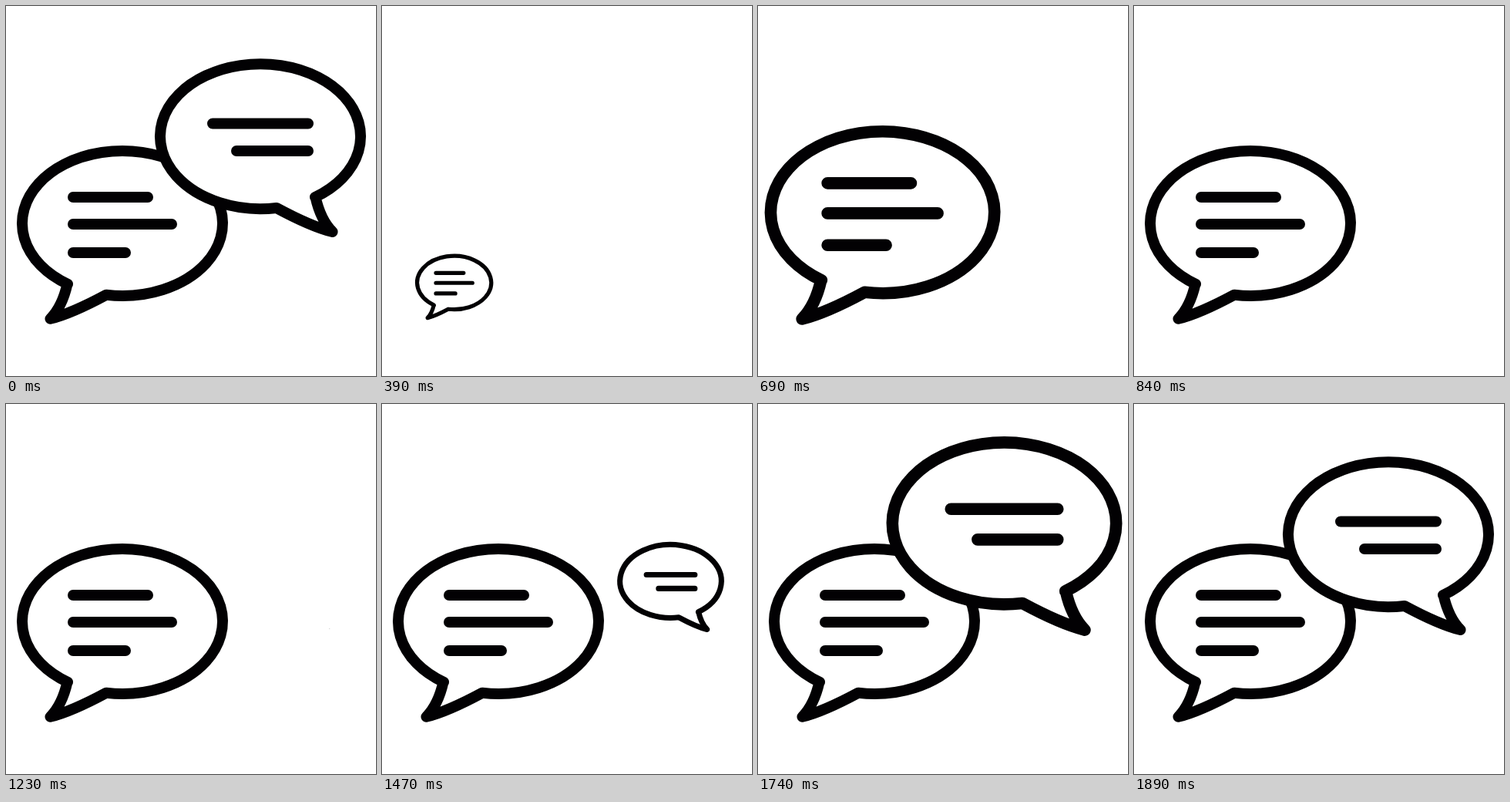
Write an HTML page with a canvas that moves like this. It is 480 px wide and 480 px high and loops after 2.7 s.

```html
<!DOCTYPE html>
<html lang="en">
<head>
<meta charset="utf-8">
<title>Chat bubbles</title>
<style>
  html, body { margin: 0; width: 100%; height: 100%; overflow: hidden; background: #fff; }
  canvas { display: block; width: 100vw; height: 100vh; }
</style>
</head>
<body>
<canvas id="stage" width="480" height="480"></canvas>
<script>
const ctx = document.getElementById('stage').getContext('2d');
const LOOP = 2700, STEP = 30;
const INK = '#020103', PAPER = '#fff';

// x, y: ellipse centre; pivot: fixed point of the scaling; lines: [x1, x2, y]
const bubbles = [
  { x: 151, y: 282, flip: 1, pivot: [60, 404], start: 150,
    lines: [[87, 184, 248], [87, 215, 283], [87, 155, 320]] },
  { x: 330, y: 169.2, flip: -1, pivot: [420, 292], start: 1200,
    lines: [[268, 392, 152.5], [299, 392, 188]] }
];

// cubic-bezier(a, 0, b, 1)
function ease(u, a, b) {
  if (u <= 0) return 0;
  if (u >= 1) return 1;
  let lo = 0, hi = 1, p = 0.5;
  for (let i = 0; i < 24; i++) {
    p = (lo + hi) / 2;
    const q = 1 - p;
    const x = 3 * p * q * q * a + 3 * p * p * q * b + p * p * p;
    if (x < u) lo = p; else hi = p;
  }
  return p * p * (3 - 2 * p);
}

// Grow past full size, then settle back
function popScale(ms) {
  const grow = 440, settle = 225, peak = 1.2;
  return ms < grow
    ? peak * ease(ms / grow, 0.72, 0.69)
    : peak - (peak - 1) * ease((ms - grow) / settle, 1 / 3, 2 / 3);
}

function drawBubble(b, scale) {
  if (scale <= 0) return;
  const [px, py] = b.pivot;
  ctx.save();
  ctx.translate(px, py);
  ctx.scale(scale, scale);
  ctx.translate(-px, -py);

  ctx.save();
  ctx.translate(b.x, b.y);
  ctx.scale(b.flip, 1);
  ctx.beginPath();
  ctx.ellipse(0, 0, 130, 94, 0, 2.148, 1.733 + 2 * Math.PI);
  ctx.quadraticCurveTo(-66, 117, -93.5, 123.8);
  ctx.quadraticCurveTo(-78, 108, -71.5, 78.8);
  ctx.closePath();
  ctx.fill();
  ctx.stroke();
  ctx.restore();

  ctx.beginPath();
  for (const [x1, x2, y] of b.lines) {
    ctx.moveTo(x1, y);
    ctx.lineTo(x2, y);
  }
  ctx.stroke();
  ctx.restore();
}

function render(t) {
  ctx.fillStyle = PAPER;
  ctx.fillRect(0, 0, 480, 480);
  ctx.strokeStyle = INK;
  ctx.lineWidth = 14;
  ctx.lineCap = ctx.lineJoin = 'round';
  for (const b of bubbles) {
    drawBubble(b, t < 150 ? 1 : popScale(t - b.start));
  }
}

let origin = null;
function tick(now) {
  if (origin === null) origin = now;
  const t = (now - origin) % LOOP;
  render(Math.floor(t / STEP) * STEP);
  requestAnimationFrame(tick);
}
render(0);
requestAnimationFrame(tick);
</script>
</body>
</html>
```
